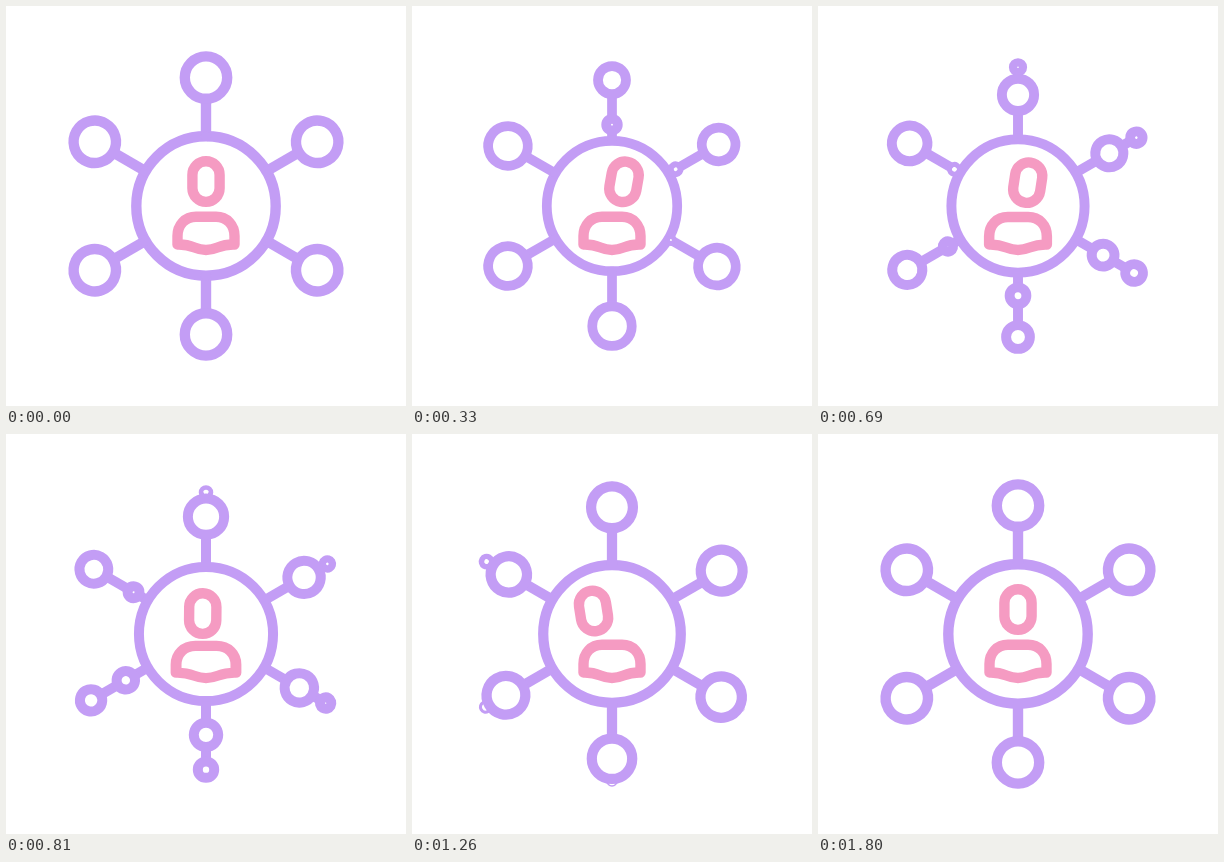
Recreate the animation shown at these times as an HTML page. Size 400 px wide and 400 px high, loop 1.83 s.

```html
<!DOCTYPE html>
<html lang="en">
<head>
<meta charset="utf-8">
<title>Network</title>
<style>
  html, body { margin: 0; width: 100%; height: 100%; overflow: hidden; background: #fff; }
  svg { display: block; width: 100%; height: 100%; }
  #net, #person { fill: none; stroke-width: 10.4; stroke-linejoin: round; }
  #net { stroke: #c39df5; }
  #net .node { fill: #fff; }
  #person { stroke: #f59bc2; }
</style>
</head>
<body>
<svg viewBox="0 0 400 400">
  <g id="net"><circle r="69.7"/></g>
  <g id="person">
    <rect id="head" x="-13.6" y="-20.3" width="27.2" height="40.6" rx="13.6"/>
    <path id="body" d="M171.5 238.5V230C171.5 219 179 210.7 190 210.7H210C221 210.7 228.5 219 228.5 230V238.5C212 238 212 244 200 244S188 238 171.5 238.5Z"/>
  </g>
</svg>
<script>
const LOOP = 1830, STEP = 30;
const RING = 69.7, ORBIT = 128.4, EXIT = 149.5, NODE = 21.2;
const SPREAD = 1200, STAGGER = 96;

const net = document.getElementById('net');
const head = document.getElementById('head');
const body = document.getElementById('body');

const clamp = x => Math.min(1, Math.max(0, x));
const mix = (a, b, p) => a + (b - a) * p;
const span = (t, from, to) => clamp((t - from) / (to - from));

// Bezier ease with control points (x1, 0) and (x2, 1)
function ease(x, x1, x2) {
  let lo = 0, hi = 1, u = x;
  for (let i = 0; i < 24; i++) {
    u = (lo + hi) / 2;
    const v = 1 - u;
    if (3 * v * v * u * x1 + 3 * v * u * u * x2 + u * u * u < x) lo = u; else hi = u;
  }
  return u * u * (3 - 2 * u);
}

function add(parent, tag, attrs) {
  const el = document.createElementNS('http://www.w3.org/2000/svg', tag);
  for (const k in attrs) el.setAttribute(k, attrs[k]);
  return parent.appendChild(el);
}

// Spokes run clockwise from the top
const spokes = Array.from({ length: 6 }, (_, i) => {
  const g = add(net, 'g', { transform: `rotate(${i * 60 - 90})` });
  return {
    line: add(g, 'line', { x1: RING }),
    leaving: add(g, 'circle', { class: 'node' }),
    arriving: add(g, 'circle', { class: 'node' })
  };
});

function place(node, x, r) {
  node.setAttribute('cx', x);
  node.setAttribute('r', Math.max(r, 0.05));
}

// Head poses: time, x, y, tilt
const poses = [
  [0, 200, 175.6, 0],
  [300, 212, 175.8, 10],
  [630, 212, 175.8, 10],
  [990, 181.5, 177, -9],
  [1290, 181.5, 177, -9],
  [1620, 200, 175.6, 0],
  [LOOP, 200, 175.6, 0]
];

function drawPerson(t) {
  const i = poses.findIndex((p, n) => n && t < p[0]);
  const a = poses[i - 1], b = poses[i];
  const p = ease(span(t, a[0], b[0]), 0.33, 0.67);
  const [x, y, tilt] = [1, 2, 3].map(k => mix(a[k], b[k], p));
  // Squash while swinging from right to left
  const dip = Math.sin(Math.PI * ease(span(t, 630, 990), 0.33, 0.67));
  head.setAttribute('transform', `translate(${x} ${y + 3.2 * dip}) rotate(${tilt})`);
  body.setAttribute('transform',
    `translate(200 249) scale(${1 + 0.05 * dip} ${1 - 0.03 * dip}) translate(-200 -249)`);
}

function drawNet(t) {
  const scale = t < 300 ? mix(1, 0.934, t / 300) : mix(0.934, 1, span(t, 300, 1500));
  net.setAttribute('transform', `translate(200 200) scale(${scale})`);
  spokes.forEach((s, i) => {
    const start = i * STAGGER;
    const p = ease(span(t, start, start + SPREAD), 0.31, 0.37);
    const out = mix(ORBIT, EXIT, p);
    s.line.setAttribute('x2', out);
    place(s.leaving, out, NODE * (1 - p));
    place(s.arriving, mix(RING, ORBIT, p), NODE * p);
  });
}

function frame(now) {
  const t = Math.floor((now % LOOP) / STEP) * STEP;
  drawNet(t);
  drawPerson(t);
}

let origin;
function tick(now) {
  origin ??= now;
  frame(Math.max(0, now - origin));
  requestAnimationFrame(tick);
}
frame(0);
requestAnimationFrame(tick);
</script>
</body>
</html>
```
